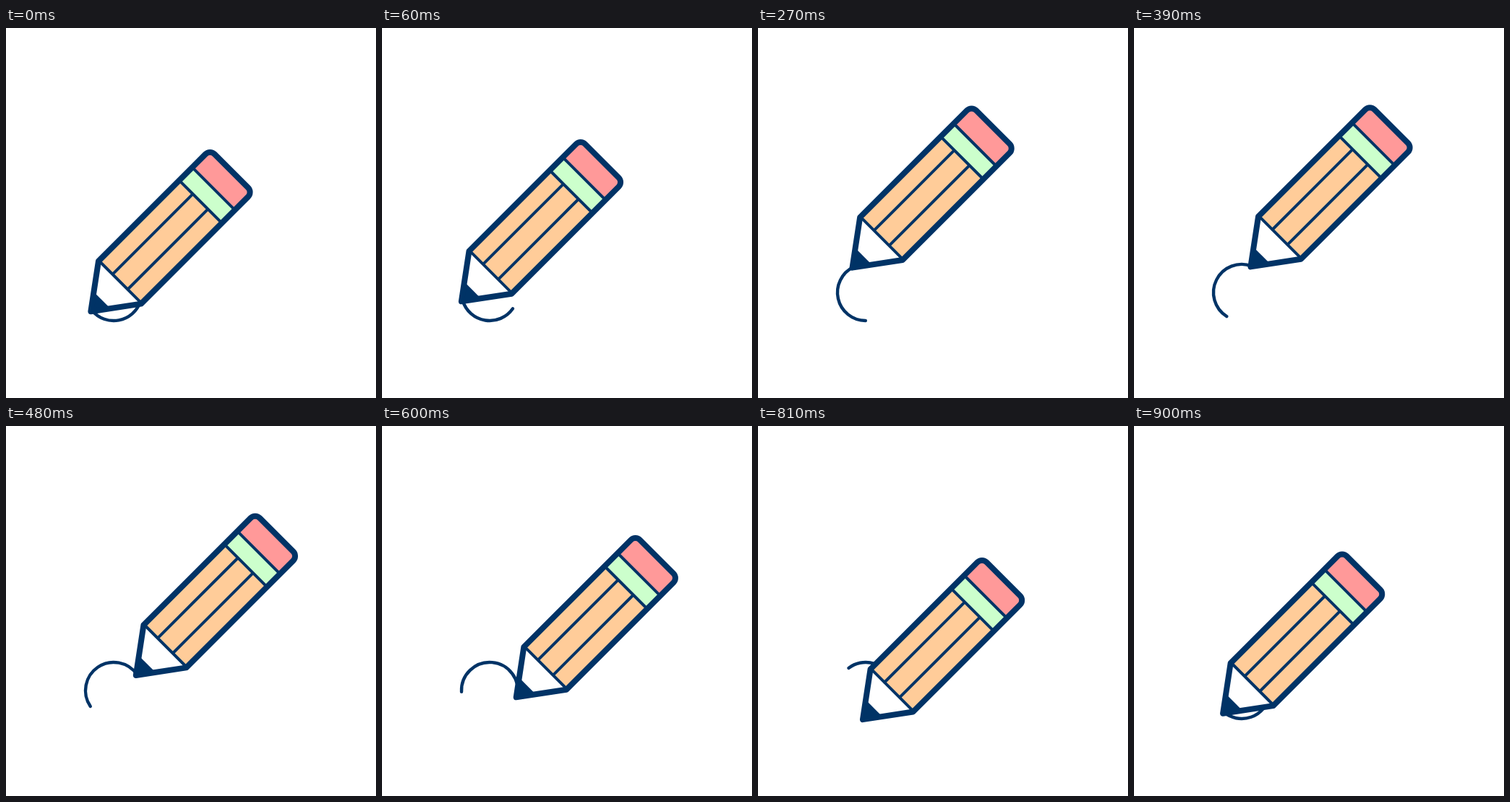
Write an HTML page that moves like this. It is 512 px wide and 512 px high and loops after 930 ms.

```html
<!DOCTYPE html>
<html lang="en">
<head>
<meta charset="utf-8">
<title>Pencil loader</title>
<style>
  html, body { margin: 0; width: 100%; height: 100%; overflow: hidden; background: #fff; }
  svg { display: block; width: 100%; height: 100%; }
</style>
</head>
<body>
<svg viewBox="0 0 512 512" fill="none" stroke="#036" stroke-linecap="round" stroke-linejoin="round">
  <path id="trail" stroke-width="4.4"/>
  <!-- the pencil lies along +x with its tip at the origin -->
  <g id="pencil">
    <path d="M0 0L56.7 -41.7V41.7Z" fill="#fff" stroke="none"/>
    <path d="M0 0L22 -16.2V16.2Z" fill="#036" stroke="none"/>
    <path d="M56.7 -41.7H215V41.7H56.7Z" fill="#ffcc99" stroke="none"/>
    <path d="M214.7 -41.7H240.2V41.7H214.7Z" fill="#ccffcc" stroke="none"/>
    <path d="M240.2 -41.7H266A9 9 0 0 1 275 -32.7V32.7A9 9 0 0 1 266 41.7H240.2Z" fill="#ff9999" stroke="none"/>
    <path d="M57.6 -41.7V41.7M214.7 -41.7V41.7M240.2 -41.7V41.7M57.6 -15.1H214.7M57.6 14.5H214.7" stroke-width="4"/>
    <path d="M0 0L56.7 -41.7H266A9 9 0 0 1 275 -32.7V32.7A9 9 0 0 1 266 41.7H56.7Z" stroke-width="8"/>
  </g>
</svg>
<script>
  const LOOP = 930, STEP = 30;
  const trail = document.getElementById('trail');
  const pencil = document.getElementById('pencil');

  function onCircle(cx, cy, r, deg) {
    const a = deg * Math.PI / 180;
    return [cx + r * Math.cos(a), cy + r * Math.sin(a)].map(n => n.toFixed(2)).join(' ');
  }

  function draw(ms) {
    const t = Math.floor(ms % LOOP / STEP) * STEP;
    const head = 140 + 360 * t / LOOP;
    const tail = 19 + 245.5 * t / LOOP;
    const large = head - tail > 180 ? 1 : 0;
    const from = onCircle(149, 366, 39, tail);
    const to = onCircle(149, 366, 39, head);
    trail.setAttribute('d', `M${from}A39 39 0 ${large} 1 ${to}`);
    pencil.setAttribute('transform', `translate(${onCircle(147.4, 367, 39.2, head)}) rotate(-45)`);
  }

  const start = performance.now();
  function tick() {
    draw(performance.now() - start);
    requestAnimationFrame(tick);
  }
  draw(0);
  requestAnimationFrame(tick);
</script>
</body>
</html>
```
